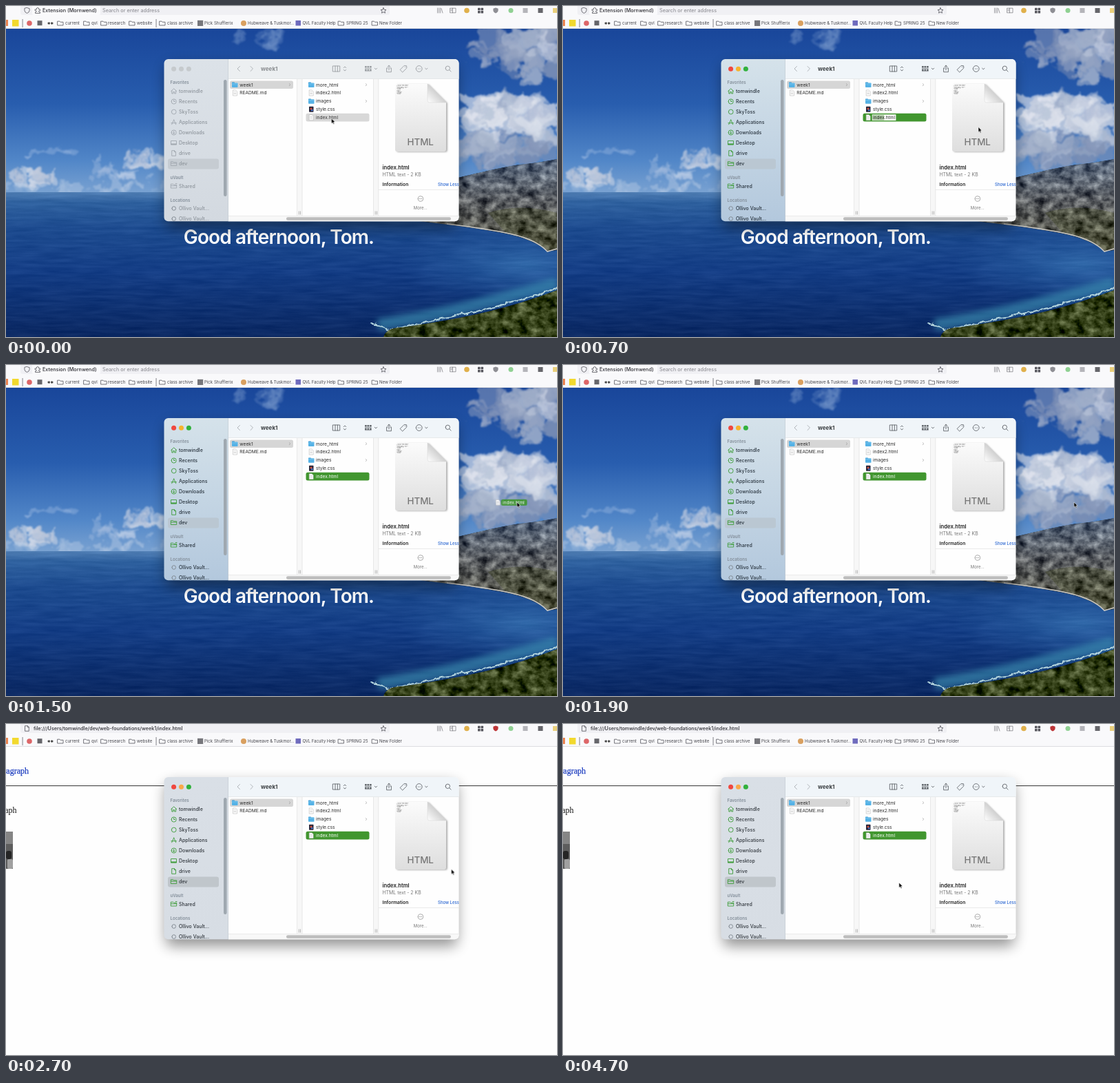
An HTML page that plays this animation: 800 by 480 pixels, repeating every 4800 ms.

```html
<!DOCTYPE html>
<html lang="en">
<head>
<meta charset="utf-8">
<title>Opening a page from a folder</title>
<style>
html, body { margin: 0; width: 800px; height: 480px; overflow: hidden; background: #f9f9fb; }
svg { position: absolute; left: 0; top: 0; width: 800px; height: 480px; font-family: Inter, Roboto, sans-serif; }
svg, svg .show { animation: 4800ms step-end infinite; }
filter { color-interpolation-filters: sRGB; }
#scene { will-change: opacity; }
#ui { animation-name: focus; }
.photo { animation-name: photo !important; }
.before { animation-name: before !important; }
.after { animation-name: after !important; }
.rename { animation-name: rename !important; }
.ghost { animation-name: ghost !important; }
#cursor { animation: move 4800ms linear infinite; }
.line { fill: none; stroke-linecap: round; stroke-linejoin: round; }
.ink { fill: var(--ink); }
.icon { stroke: var(--icon); stroke-width: .9; }
.tool { stroke: var(--tool); stroke-width: .9; }
.chrome { stroke: #55555c; stroke-width: .8; }
.serif { font-family: "Liberation Serif", "Noto Serif", serif; }

@keyframes focus {
  0% { --ink: #8e959c; --icon: #a2a9b0; --tool: #9a9ea2; --title: #8a8d90; --bar: #eceff1;
    --s1: #dce2e8; --s2: #d3d9e0; --sel: #c6ccd2; --row: #d8d8d8; --rowInk: #333;
    --red: #c6cacd; --yel: #c6cacd; --grn: #c6cacd; }
  4.166% { --ink: #27323c; --icon: #3f9c3a; --tool: #62676c; --title: #3c4043; --bar: #f0f5f9;
    --s1: #d5e2ea; --s2: #b3c8dd; --sel: #bac7d2; --row: #41962f; --rowInk: #fff;
    --red: #f0483f; --yel: #f5b32e; --grn: #32b13d; }
  41.666%, 100% { --ink: #30363c; --icon: #3f9c3a; --tool: #62676c; --title: #3c4043; --bar: #f0f5f9;
    --s1: #d9dfe6; --s2: #d7dde4; --sel: #c0c6cb; --row: #41962f; --rowInk: #fff;
    --red: #f0483f; --yel: #f9a848; --grn: #32b13d; }
}
@keyframes photo { 0% { opacity: 1 } 41.666%, 100% { opacity: 0 } }
@keyframes before { 0% { opacity: 1 } 45.833%, 100% { opacity: 0 } }
@keyframes after { 0% { opacity: 0 } 45.833%, 100% { opacity: 1 } }
@keyframes rename { 0% { opacity: 0 } 10.416% { opacity: 1 } 16.666%, 100% { opacity: 0 } }
@keyframes ghost { 0% { opacity: 0 } 16.666% { opacity: 1 } 35.416%, 100% { opacity: 0 } }
@keyframes move {
  0%, 6.25% { transform: translate(472.5px, 163px); animation-timing-function: steps(4) }
  14.583% { transform: translate(603px, 175.5px); animation-timing-function: steps(5) }
  25% { transform: translate(765.5px, 195.5px); animation-timing-function: steps(3) }
  31.25%, 50% { transform: translate(741.8px, 198.8px); animation-timing-function: steps(8) }
  66.666%, 100% { transform: translate(487.8px, 230px) }
}
</style>
</head>
<body>
<svg id="scene" class="show photo" viewBox="0 0 800 480">
  <defs>
    <linearGradient id="sky" x2="0" y2="1">
      <stop stop-color="#19469a"/><stop offset=".45" stop-color="#285dae"/>
      <stop offset=".8" stop-color="#5287c8"/><stop offset="1" stop-color="#7ba3d2"/>
    </linearGradient>
    <linearGradient id="sea" x2="0" y2="1">
      <stop stop-color="#517fb5"/><stop offset=".07" stop-color="#2f619f"/><stop offset=".25" stop-color="#1e4c90"/>
      <stop offset=".55" stop-color="#143d85"/><stop offset="1" stop-color="#0b2862"/>
    </linearGradient>
    <radialGradient id="bay"><stop stop-color="#3a76b4" stop-opacity=".75"/><stop offset="1" stop-color="#2a62a5" stop-opacity="0"/></radialGradient>
    <linearGradient id="hill" x2="0" y2="1">
      <stop stop-color="#566580"/><stop offset=".45" stop-color="#5c5f68"/><stop offset="1" stop-color="#55544a"/>
    </linearGradient>
    <filter id="fluff" x="-20%" y="-20%" width="140%" height="140%">
      <feTurbulence type="fractalNoise" baseFrequency=".045" numOctaves="5" seed="4"/>
      <feDisplacementMap in="SourceGraphic" scale="34" xChannelSelector="R" yChannelSelector="G"/>
      <feGaussianBlur stdDeviation="1.3"/>
    </filter>
    <filter id="rough" x="-5%" y="-20%" width="110%" height="140%">
      <feTurbulence type="fractalNoise" baseFrequency=".09" numOctaves="3" seed="8"/>
      <feDisplacementMap in="SourceGraphic" scale="9" xChannelSelector="R" yChannelSelector="G"/>
      <feGaussianBlur stdDeviation=".5"/>
    </filter>
    <filter id="rock" x="0" y="0" width="1" height="1">
      <feTurbulence type="fractalNoise" baseFrequency=".07 .09" numOctaves="4" seed="3"/>
      <feColorMatrix values="1 0 0 0 0 1 0 0 0 0 .95 0 0 0 0 0 0 0 0 1" result="grain"/>
      <feComposite in="SourceGraphic" in2="grain" operator="arithmetic" k2="1" k3=".8" k4="-.4"/>
      <feComposite in2="SourceGraphic" operator="in"/>
    </filter>
    <filter id="ripple" x="0" y="0" width="1" height="1">
      <feTurbulence type="fractalNoise" baseFrequency=".02 .2" numOctaves="3" seed="5"/>
      <feColorMatrix values="1 0 0 0 0 1 0 0 0 0 1 0 0 0 0 0 0 0 0 1" result="grain"/>
      <feComposite in="SourceGraphic" in2="grain" operator="arithmetic" k2="1" k3=".09" k4="-.045"/>
    </filter>
    <filter id="soft" x="-5%" y="-40%" width="110%" height="180%"><feGaussianBlur stdDeviation="4"/></filter>
  </defs>
  <rect y="33" width="800" height="240" fill="url(#sky)"/>
  <g id="clouds" filter="url(#fluff)"></g>
  <g filter="url(#ripple)">
    <rect y="270" width="800" height="210" fill="url(#sea)"/>
    <ellipse cx="755" cy="375" rx="190" ry="58" fill="url(#bay)"/>
  </g>
  <g filter="url(#rock)">
    <path d="M600 262Q660 248 690 241T745 230Q775 227 800 222V354L787 356Q765 338 725 330T600 312Z" fill="url(#hill)"/>
    <path d="M700 300Q745 285 800 300V352L787 354Q765 338 725 328Z" fill="#44472f" opacity=".45"/>
  </g>
  <path d="M640 316Q700 323 735 331T786 356L800 352" fill="none" stroke="#c9c8c4" stroke-width="1.6"/>
  <path d="M540 462Q640 448 800 402" fill="none" stroke="#3d8fb2" stroke-width="17" opacity=".65" filter="url(#soft)"/>
  <path d="M528 460Q548 463 556 470Q640 452 690 441T800 409" fill="none" stroke="#b5d6de" stroke-width="2" filter="url(#rough)"/>
  <path d="M548 480Q552 466 575 466Q650 455 700 443T800 412V480Z" fill="#36421f" filter="url(#rock)"/>
  <text x="396" y="345" font-size="28" font-weight="600" letter-spacing="-.9" text-anchor="middle" fill="#fff">Good afternoon, Tom.</text>
</svg>
<svg id="ui" viewBox="0 0 800 480">
  <defs>
    <linearGradient id="side" x2="0" y2="1">
      <stop style="stop-color:var(--s1)"/><stop offset="1" style="stop-color:var(--s2)"/>
    </linearGradient>
    <linearGradient id="paper" x2="0" y2="1"><stop stop-color="#fbfbfb"/><stop offset="1" stop-color="#dedede"/></linearGradient>
    <linearGradient id="fold" x2="1" y1="1" y2="0"><stop stop-color="#fff"/><stop offset=".5" stop-color="#d2d2d2"/></linearGradient>
    <clipPath id="frame"><rect x="229.5" y="77" width="428" height="235.3" rx="6"/></clipPath>
    <filter id="blur" x="-30%" y="-30%" width="160%" height="170%"><feGaussianBlur stdDeviation="10"/></filter>
    <filter id="lift"><feDropShadow dy=".8" stdDeviation="1" flood-opacity=".3"/></filter>
  </defs>
  <g id="page" class="show after"></g>
  <g id="browser"></g>
  <rect x="232" y="86" width="423" height="236" rx="8" opacity=".42" filter="url(#blur)"/>
  <g id="finder" clip-path="url(#frame)"></g>
  <g id="cursor"></g>
</svg>
<script>
const $ = id => document.getElementById(id);
const fill = (id, ...parts) => { $(id).innerHTML = parts.flat().join(''); };
const esc = s => s.replace(/&/g, '&amp;').replace(/</g, '&lt;');
const text = (x, y, s, size, attrs = '') => `<text x="${x}" y="${y}" font-size="${size}" ${attrs}>${esc(s)}</text>`;
const box = (x, y, w, h, color, r = 0) =>
  `<rect x="${x}" y="${y}" width="${w}" height="${h}" rx="${r}" style="fill:${color}"/>`;
const dot = (x, y, r, color) => `<circle cx="${x}" cy="${y}" r="${r}" style="fill:${color}"/>`;
const line = (x, y, d, kind, attrs = '') => `<path class="line ${kind}" transform="translate(${x} ${y})" d="${d}" ${attrs}/>`;
const show = (kind, ...parts) => `<g class="show ${kind}">${parts.join('')}</g>`;

let seed = 11;
const rnd = () => (seed = seed * 16807 % 2147483647) / 2147483647;
const blobs = (cx, cy, w, h, n, r, colors, alpha) => Array.from({ length: n }, () => {
  const a = rnd() * 6.283, d = Math.sqrt(rnd()), k = r * (.5 + rnd());
  return `<ellipse cx="${cx + Math.cos(a) * d * w}" cy="${cy + Math.sin(a) * d * h}" rx="${k}" ry="${k * .65}"
    fill="${colors[Math.floor(rnd() * colors.length)]}" opacity="${alpha}"/>`;
}).join('');

// Wallpaper clouds
const white = ['#e3e7ef', '#d0d7e5', '#b9c4d9'], grey = ['#93a2c0', '#a5b2cb', '#7c8eb3'];
fill('clouds',
  blobs(712, 65, 38, 24, 22, 13, grey, .5),
  blobs(775, 68, 38, 42, 30, 16, grey, .6),
  blobs(775, 60, 25, 20, 12, 9, white, .4),
  blobs(738, 178, 72, 42, 60, 17, [...white, ...grey], .6),
  blobs(725, 212, 75, 16, 30, 13, grey, .55),
  blobs(705, 150, 34, 24, 22, 12, white, .65),
  blobs(765, 150, 28, 25, 16, 12, white, .5),
  blobs(38, 248, 30, 9, 22, 7, white, .55),
  blobs(165, 236, 60, 18, 28, 7, ['#a7bede', '#bccde6'], .4),
  blobs(198, 222, 28, 12, 16, 7, white, .45),
  blobs(120, 263, 140, 5, 30, 8, ['#b3c8e3', '#94b3da'], .45),
  blobs(60, 211, 40, 2, 8, 5, ['#9dbae2'], .4),
  blobs(365, 47, 50, 7, 16, 8, ['#6f93c8'], .3));

// Opened page
fill('page',
  box(0, 33, 800, 447, '#fefefe'),
  text(33, 72, 'paragraph', 12, 'class="serif" text-anchor="end" fill="#1f3fc0" stroke="#1f3fc0" stroke-width=".25"'),
  box(0, 89, 800, 1.1, '#444'),
  text(15.5, 129, 'paragraph', 12, 'class="serif" text-anchor="end" fill="#111"'),
  box(0, 156, 10, 54, '#5d5d5d'), box(0, 156, 10, 18, '#858585'), box(0, 184, 8, 12, '#252525', 3),
  box(2, 196, 8, 14, '#a0a0a0', 2));

// Browser bars
const folder = 'M-4 -2.8H-1L0 -1.7H4V3H-4Z';
const shield = 'M0 -4L3.6 -2.8V0Q3.4 2.7 0 4Q-3.4 2.7 -3.6 0V-2.8Z';
const sheet = 'M-2.6 -3.8H.8L2.8 -1.8V3.8H-2.6ZM.8 -3.8V-1.8H2.8';
const marks = [[79, 86, 'current'], [117, 124, 'qvl'], [142, 148, 'research'], [183, 190, 'website'],
  [227, 234, 'class archive'], [486.5, 494, 'SPRING 25'], [535.5, 542, 'New Folder']];
const label = (x, s) => text(x, 27.2, s, 6.1, 'fill="#45454b"');
fill('browser',
  box(0, 0, 800, 33, '#f9f9fb'), box(0, 32, 800, .8, '#d6d6db'),
  box(21, -6, 536, 19, '#f0f0f4', 3),
  show('before',
    line(30.5, 6.5, shield, 'chrome'), box(38, -4, 99, 17, '#fafafc', 2),
    line(46, 6.5, 'M-3.5 -1.6H-1.5Q-2.3 -4 0 -4T1.5 -1.6H3.5V.3Q1.3 0 1.3 1.3T3.5 2.4V4H-3.5V2.4Q-1.4 2.2 -1.4 1.2T-3.5 .2Z', 'chrome'),
    text(53, 9.4, 'Extension (Mornwend)', 7.25, 'font-weight="500" fill="#2d2d33"'),
    text(140, 9.4, 'Search or enter address', 7.3, 'fill="#85858c"'),
    line(711, 6.5, shield, '', 'style="fill:#8e8e94"')),
  show('after',
    line(30.5, 6.5, sheet, 'chrome'),
    text(40, 9.4, 'file:///Users/tomwindle/dev/web-foundations/week1/index.html', 7.15, 'font-weight="500" fill="#2d2d33"'),
    line(711, 6.5, shield, '', 'style="fill:#bd3437"')),
  line(548, 6.6, 'M0 -4L1.2 -1.3L4 -1L1.9 .8L2.5 3.6L0 2.2L-2.5 3.6L-1.9 .8L-4 -1L-1.2 -1.3Z', 'chrome'),
  line(630, 6.5, 'M-3.5 -3.5V3.5M-1.4 -3.5V3.5M.7 -3.5V3.5M2 -3L4 3.5', 'chrome', 'opacity=".7"'),
  line(649, 6.5, 'M-4 -3.3H4V3.3H-4ZM-.5 -3.3V3.3M-3 -1.3H-1.6M-3 .4H-1.6', 'chrome', 'opacity=".7"'),
  dot(669, 6.5, 3.8, '#e0b04c'),
  [[685, 2.8], [689.5, 2.8], [685, 7], [689.5, 7]].map(([x, y]) => box(x, y, 3.6, 3.5, '#55555c', .6)),
  dot(733, 6.5, 3.5, '#8fd092'), box(750.5, 3, 7, 7, '#b4b4b9'), box(772.5, 3, 7, 7, '#66666b'),
  box(794, 3, 6, 7, '#e9cf7c'),
  box(0, 20, 3, 9, '#ec8552'), box(9, 20, 9.5, 9.5, '#f2d92e'),
  box(23.6, 19, .9, 12, '#77777d'), dot(34, 25, 3.8, '#dd6668'), box(45.5, 21.2, 7, 7, '#66666b'),
  text(60, 26.8, '✱✱', 5.3, 'fill="#333"'),
  marks.map(([ix, x, s]) => line(ix, 25, folder, 'chrome') + label(x, s)),
  box(217.6, 19, .9, 12, '#77777d'),
  box(278, 20.8, 8.2, 8.2, '#77777c'), label(288, 'Pick Shufflerix'),
  dot(345, 25, 4, '#d9a060'), label(351, 'Hubweave & Tuskmor...'),
  box(420.5, 21, 7.5, 7.5, '#6f6bbd'), text(430.5, 27.2, 'QVL Faculty Help', 5.9, 'fill="#45454b"'));

// File window
const ring = r => `M${-r} 0A${r} ${r} 0 1 1 ${r} 0A${r} ${r} 0 1 1 ${-r} 0`;
const side = [
  [123.5, 'tomwindle', 'M-4 0L0 -3.7L4 0M-2.9 -.8V3.5H-.9V1H.9V3.5H2.9V-.8'],
  [138.5, 'Recents', ring(3.6) + 'M0 -2.2V0H1.8'],
  [153.5, 'SkyToss', ring(3.4)],
  [168.5, 'Applications', 'M0 -3.5L-3 3.3M0 -3.5L3 3.3M-3.8 1.2H3.8'],
  [183.5, 'Downloads', ring(3.6) + 'M0 -2V1.8M-1.5 .4L0 1.9L1.5 .4'],
  [198.5, 'Desktop', 'M-3.8 -3H3.8V2.7H-3.8ZM-3.8 1.4H3.8M-3.8 2H3.8'],
  [213.5, 'drive', sheet], [228.5, 'dev', folder + 'M-4 -.5H4'],
  [261, 'Shared', folder + 'M-4 -.3H4M2.5 -3.5H4.3'],
  [293.5, 'Ollivo Vault...', ring(2.8)], [308.5, 'Ollivo Vault...', ring(2.8)]];
const heads = [[113.2, 'Favorites'], [251.2, 'uVault'], [283.7, 'Locations']];
const blueFolder = (x, y) => box(x, y - 3.6, 4, 3, '#3f9bd3', .7) + box(x, y - 2.8, 8.5, 6.6, '#55b2e6', .8) + box(x, y - 1.6, 8.5, .6, '#8fd0f2');
const file = (x, y) => `<path d="M${x} ${y - 4}h4l2 2v6h-6z" fill="#fff" stroke="#aaa" stroke-width=".5"/>` +
  [-1.5, 0, 1.5].map(d => box(x + 1.2, y + d, 3.4, .4, '#aaa')).join('');
const name = (x, y, s, attrs = 'fill="#2b2b2b"') => text(x, y + 2.4, s, 6.6, attrs);
const arrow = (x, y) => line(x, y, 'M-.7 -1.5L.8 0L-.7 1.5', '', 'stroke="#999" stroke-width=".7"');
const divider = x => box(x, 106, 8, 198, '#f7f7f7') + box(x, 106, .6, 198, '#dedede') + box(x + 7.4, 106, .6, 198, '#dedede') +
  box(x + 2.6, 297.5, .7, 5, '#999') + box(x + 4.8, 297.5, .7, 5, '#999');
const dots = (x, y, color) => [-1.7, 0, 1.7].map(d => dot(x + d, y, .55, color)).join('');
const down = 'M-1.7 -.8L0 .9L1.7 -.8';

fill('finder',
  box(229, 77, 94, 236, 'url(#side)'), box(323, 77, 335, 236, '#fefefe'),
  box(323, 77, 335, 28.5, 'var(--bar)'), box(323, 105, 335, .6, '#dcdfe2'), box(322.4, 77, .6, 236, '#c3cbd2'),
  ['red', 'yel', 'grn'].map((c, i) => dot(243.6 + i * 10.9, 91.2, 3.5, `var(--${c})`)),
  heads.map(([y, s]) => text(238.5, y, s, 6.1, 'font-weight="600" fill="#828d98"')),
  box(235, 221.5, 74, 15, 'var(--sel)', 3),
  side.map(([y, s, d]) => line(243.7, y, d, 'icon', y > 290 ? 'style="stroke:#7d858d"' : '') +
    text(251, y + 2.5, s, 7, 'class="ink" font-weight="500"')),
  box(316, 107, 4.6, 169, '#9fa8b0', 2.3),

  line(338, 91, 'M1.5 -3.5L-2 0L1.5 3.5', '', 'stroke="#a9adb1" stroke-width=".9"'),
  line(356.5, 91, 'M-1.5 -3.5L2 0L-1.5 3.5', '', 'stroke="#a9adb1" stroke-width=".9"'),
  text(370, 94, 'week1', 8.1, 'font-weight="700" style="fill:var(--title)"'),
  line(479.7, 91, 'M-5 -4H5V4H-5ZM-1.7 -4V4M1.7 -4V4', 'tool'),
  line(492, 91, 'M-1.7 -1.4L0 -3.1L1.7 -1.4M-1.7 1.4L0 3.1L1.7 1.4', 'tool'),
  [0, 1].map(r => [0, 1, 2].map(c => box(521 + c * 3.5, 87 + r * 4.4, 2.7, 2.5, 'var(--tool)', .5)).join('') +
    box(521, 90.1 + r * 4.4, 9.7, .6, 'var(--tool)')),
  line(537, 91, down, 'tool'),
  line(556, 91, 'M-1.8 -1H-3.4V4.7H3.4V-1H1.8M0 2V-4.8M-2 -2.9L0 -4.9L2 -2.9', 'tool'),
  line(577, 91, 'M-4.6 1.2L1.2 -4.6L4.6 -4.2L4.8 -1L-1 4.8ZM2.5 -2.5h.1', 'tool'),
  line(599.7, 91, ring(4.4), 'tool'), dots(599.7, 91, 'var(--tool)'), line(610.3, 91, down, 'tool'),
  line(641.3, 90.3, ring(3.2) + 'M2.3 2.3L4.8 4.8', 'tool'),

  box(325, 108.4, 92, 11.7, '#d6d6d6', 2.5), blueFolder(328, 114.2), name(339.3, 114.2, 'week1'), arrow(412, 114.2),
  file(329.5, 126), name(339.3, 126, 'README.md'),
  divider(422.3), divider(533.2),
  blueFolder(439, 114.2), name(450, 114.2, 'more_html'), arrow(523, 114.2),
  file(440.2, 126), name(450, 126, 'index2.html'),
  blueFolder(439, 138), name(450, 138, 'images'), arrow(523, 138),
  box(440, 145.8, 6.5, 8, '#29273b', .7), dot(443, 149, 1.5, '#d8533f'), box(443, 150.2, 2.6, 2, '#4a76cf'),
  name(450, 149.8, 'style.css'),
  box(435.5, 155.8, 92, 11.8, 'var(--row)', 2.5), file(440.2, 161.7), name(450, 161.7, 'index.html', 'style="fill:var(--rowInk)"'),
  show('rename', box(448.8, 157.3, 34.6, 8.8, '#fff'), box(449.5, 157.8, 16.8, 7.8, '#aecaa5'), name(450, 161.7, 'index.html')),

  `<path d="M568 113H612L639 140V208Q639 211 636 211H568Q565 211 565 208V116Q565 113 568 113Z" fill="url(#paper)" filter="url(#lift)"/>`,
  `<path d="M612 113L639 140H615Q612 140 612 137Z" fill="url(#fold)" stroke="#ccc" stroke-width=".4"/>`,
  ['<!DOCTYPE html>', '<html lang="en">', '<head>', ' <title>', '</head>', '<body>'].map((s, i) =>
    text(567, 116.4 + i * 2.4, s, 2, 'fill="#555"')),
  text(601.7, 201.5, 'HTML', 13.4, 'font-weight="500" text-anchor="middle" fill="#777"'),
  text(546.5, 236.6, 'index.html', 7.7, 'font-weight="600" fill="#222"'),
  text(546.5, 247.4, 'HTML text - 2 KB', 6.9, 'fill="#777"'),
  text(546.5, 260.5, 'Information', 6.8, 'font-weight="600" fill="#222"'),
  text(627, 260.5, 'Show Less', 6, 'font-weight="500" fill="#2462d0"'),
  box(541, 266.3, 117, .6, '#dedede'),
  line(602, 279.5, ring(3.8), '', 'stroke="#888" stroke-width=".7"'), dots(602, 279.5, '#888'),
  text(601.7, 294.5, 'More...', 6, 'text-anchor="middle" fill="#777"'),
  box(323, 304, 335, 9, '#f8f8f8'), box(323, 304, 335, .6, '#e2e2e2'), box(407, 306.3, 239, 4.4, '#bdbdbd', 2.2));

// Pointer with the dragged file
fill('cursor',
  show('ghost', `<g opacity=".9">${file(-30.5, .5)}${box(-23, -4, 38, 9, '#41962f', 2.5)}${text(-20.5, 2.9, 'index.html', 6.5, 'fill="#fff"')}</g>`),
  '<path d="M0 0V7.4L1.7 5.9L2.9 8.6L4.2 8L3 5.4L5.2 5.2Z" fill="#000" stroke="#fff" stroke-width=".6"/>');
</script>
</body>
</html>
```
